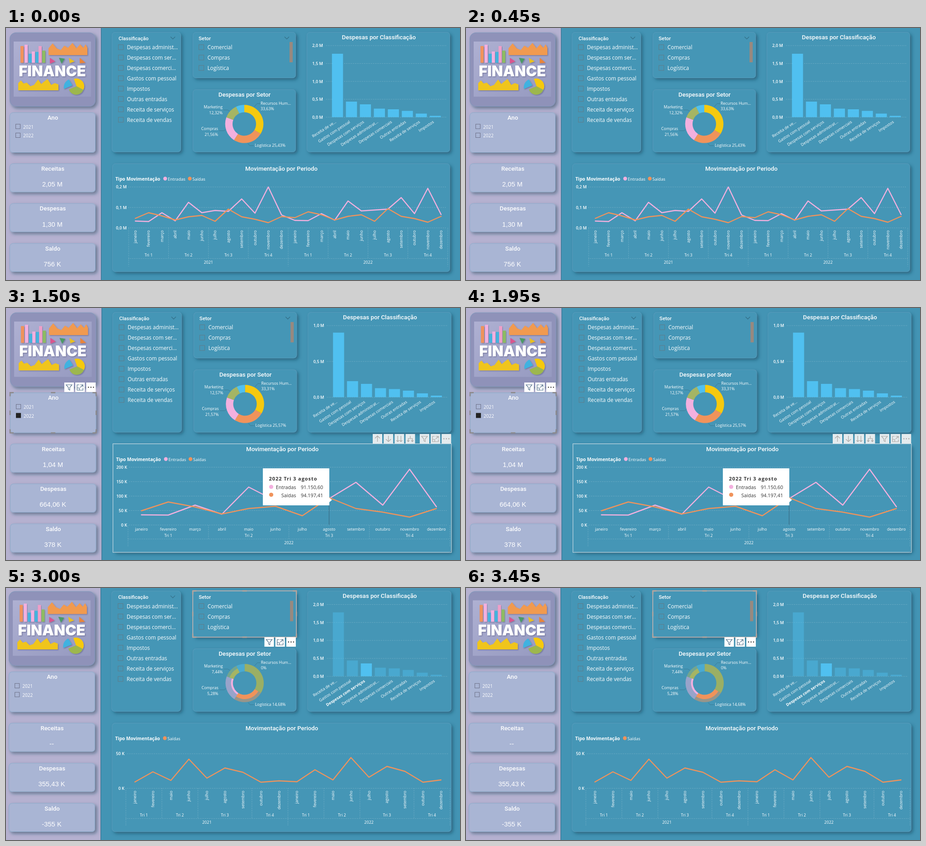
Animation, 1004 px wide and 558 px high, one loop 3.75 s. Source, as an HTML page:

```html
<!DOCTYPE html>
<html lang="pt">
<head>
<meta charset="utf-8">
<title>Painel financeiro</title>
<style>
html, body { margin: 0; width: 100%; height: 100%; overflow: hidden; background: #4394b4; }
svg { display: block; width: 100vw; height: 100vh; }
text { font-family: "Open Sans", "Noto Sans", sans-serif; fill: #fff; white-space: pre; }
.t { font-family: Roboto, sans-serif; font-weight: 500; }
.v { font-family: "Liberation Sans", Arial, sans-serif; }
.h { font-family: Inter, sans-serif; font-weight: 900; }
.b { font-weight: 700; }
.m { font-weight: 600; }
.d { fill: #333; }
.dot { stroke: #b4d3df; stroke-width: 1; stroke-dasharray: 1 3; fill: none; opacity: .75; }
</style>
</head>
<body>
<svg id="stage" viewBox="0 0 1004 558" preserveAspectRatio="none"></svg>
<script>
const HOLD = 750;
const YELLOW = '#f6c90e', ORANGE = '#f0935b', PINK = '#f3b0df', GREEN = '#a5b564', BLUE = '#50c0f0';
const MONTHS = 'janeiro fevereiro março abril maio junho julho agosto setembro outubro novembro dezembro'.split(' ');
const KINDS = ['Despesas administ...', 'Despesas com ser...', 'Despesas comerci...', 'Gastos com pessoal',
  'Impostos', 'Outras entradas', 'Receita de serviços', 'Receita de vendas'];
const BAR_NAMES = ['Receita de ve...', 'Gastos com pessoal', 'Despesas com serviços', 'Despesas administrat...',
  'Despesas comerciais', 'Outras entradas', 'Receita de serviços', 'Impostos'];
const PANELS = {
  kind: [234, 9, 153, 266], sector: [413, 9, 228, 102], ring: [413, 136, 228, 139],
  bars: [665, 9, 317, 266], flow: [235, 300, 747, 240], year: [8, 187, 190, 89]
};

const text = (x, y, s, size, cls = '', anchor = 'start', more = '') =>
  `<text x="${x}" y="${y}" font-size="${size}" class="${cls}" text-anchor="${anchor}" ${more}>${s}</text>`;
const rect = (x, y, w, h, fill, more = '') =>
  `<rect x="${x}" y="${y}" width="${w}" height="${h}" fill="${fill}" ${more}/>`;
const disc = (x, y, r, fill) => `<circle cx="${x}" cy="${y}" r="${r}" fill="${fill}"/>`;
const path = (d, fill, more = '') => `<path d="${d}" fill="${fill}" ${more}/>`;
const stroke = (d, color, width = 1, more = '') =>
  path(d, 'none', `stroke="${color}" stroke-width="${width}" ${more}`);
const dots = d => `<path class="dot" d="${d}"/>`;
const each = (list, fn) => list.map(fn).join('');

function panel([x, y, w, h], fill = '#4596b6', r = 7) {
  return rect(x, y, w, h, fill, `rx="${r}" filter="url(#shade)"`) +
    rect(x + .5, y + .5, w - 1, h - 1, 'none', `rx="${r}" stroke="#6f9fc0" stroke-opacity=".45"`);
}

function box(x, y, on, color, size = 11) {
  return rect(x, y, size, size, on ? '#222' : 'none', `stroke="${on ? '#222' : color}"`);
}

const chevron = x => stroke(`M${x - 5} 19.5l5 5 5-5`, '#346f88', 1.2);

// Selection frame with corner and edge handles
function frame([x, y, w, h], line) {
  const r = x + w, b = y + h, cx = x + w / 2, cy = y + h / 2, n = 8;
  const grips = `M${x} ${y + n}v${-n}h${n}M${r - n} ${y}h${n}v${n}M${r} ${b - n}v${n}h${-n}M${x + n} ${b}h${-n}v${-n}` +
    `M${cx - 5} ${y}h10M${cx - 5} ${b}h10M${x} ${cy - 5}v10M${r} ${cy - 5}v10`;
  return (line ? rect(x, y, w, h, 'none', `stroke="${line}" stroke-width="1.6"`) : '') +
    stroke(grips, line ? '#b9a69d' : '#8d8a8c', 2.6);
}

const ICONS = {
  filter: 'M4 5h13l-5 6v6l-3-2v-4z',
  focus: 'M9 5H4v12h13v-5M11 5h6v5M17 5l-6 6M4 12h5v5',
  up: 'M10.500 17V4M5 9.500l5.500-5.500 5.500 5.500',
  down: 'M10.500 4v13M5 11.500l5.500 5.500 5.500-5.500',
  twin: 'M7 4v13M14 4v13M4 14l3 3 3-3M11 14l3 3 3-3',
  fork: 'M10.500 4v6M6 16v-6h9v6M3.500 14l2.500 3 2.500-3M12.500 14l2.500 3 2.500-3'
};

function tools(x, y, names, faded) {
  const ink = faded ? '#a9a5a2' : '#51708a';
  return each(names.split(' '), (name, i) =>
    `<g transform="translate(${x + i * 24.2} ${y})">` + rect(0, 0, 21, 21, faded ? '#e4ebee' : '#fff') +
    (name === 'more' ? each([5, 10.5, 16], cx => disc(cx, 10.5, 1.3, faded ? ink : '#333')) : stroke(ICONS[name], ink, 1.2)) +
    '</g>');
}
const MENU = 'filter focus more';

function photo() {
  const bars = [[32, 40, ORANGE], [41, 37, PINK], [50, 57, '#45b3dd'], [57, 52, PINK], [65, 53, '#45b3dd'],
    [72, 40, '#ef9fc8'], [80, 50, '#8dbb62']];
  const bits = [[97, '#d9568f', 'v13l12-5z'], [117, '#4c9a66', 'l13 2-7 11z'], [139, '#e8bf24', 'l13 8-11 4z'], [163, '#e8853a', 'l13 11-13 1z']];
  return panel([8, 10, 190, 164], '#8f92b9', 14) + rect(17, 30, 171, 122, '#a3a6ca') +
    rect(17, 30, 171, 122, 'url(#glow)') +
    each(bars, ([x, y, c]) => rect(x, y, 7, 77 - y, c, 'filter="url(#lift)"')) +
    '<g filter="url(#lift)">' +
    path('M94 60V45l9-11 9 11 9 4 8-10 8 5 10-11 9 12 8-9 7 8 5-8 4 8v16z', '#f19a50') +
    each(bits, ([x, c, d]) => path(`M${x} 66${d}`, c)) +
    path('M27 138v-16l6-6 6 7 7-2 8 8 8-3 9-12 7 10 7-6 7-5 8 13 8-4 8 3v13z', '#f0c51d') +
    path('M156 129l-6-16a17 17 0 0 1 21 24z', YELLOW) +
    path('M156 129l15 8a17 17 0 0 1-32-1z', '#9db74e') +
    path('M147 127l-19 8q-2-14 11-21z', '#3fb2e0') +
    text(102.500, 107, 'FINANCE', 32.5, 'h', 'middle') + '</g>';
}

function board(s) {
  const [x, y, k] = s.view;
  const cards = ['Receitas', 'Despesas', 'Saldo'];
  const kinds = s.kinds || KINDS;
  const list = (names, left, on) => each(names, (n, i) =>
    box(left + .5, 37 + 22.95 * i, i === on, '#5f7c8a') + text(left + 19.500, 47.2 + 22.95 * i, n, 11.8));
  return rect(0, 0, 1004, 558, '#4394b4') + `<g transform="translate(${x} ${y}) scale(${k})">` +
    rect(-9, -9, 219, 590, '#b5b1d0') + stroke('M210.500 -9V590', '#39708f', 1.2) + photo() +
    panel(PANELS.year, '#a9b5d4') + text(103.500, 203, 'Ano', 13.2, 't', 'middle') +
    each([2021, 2022], (n, i) => box(21.5, 213 + i * 19.5, n === s.year, '#6c7088', 10) + text(38, 222.7 + i * 19.5, n, 10)) +
    each(cards, (n, i) => panel([8, 300 + i * 88.3, 190, 63.5], '#a9b5d4') +
      text(103.500, 316 + i * 88.4, n, 13.2, 't', 'middle') + text(102.500, 351 + i * 88.5, s.totals[i], 14.7, 'v', 'middle')) +
    each(['kind', 'sector', 'ring', 'bars', 'flow'], n => panel(PANELS[n])) +
    text(249, 27, 'Classificação', 11, 't') + text(426, 27, 'Setor', 11.3, 't') +
    list(kinds, 248, s.kind) + list(['Comercial', 'Compras', 'Logística'], 426, s.sector) +
    rect(627, 31, 7, 45, '#98897f') + each(s.chevrons, chevron) +
    text(824.500, 25, 'Despesas por Classificação', 13.2, 't', 'middle') +
    text(527.500, 152, 'Despesas por Setor', 13.2, 't', 'middle') +
    text(609, 316, 'Movimentação por Periodo', 13.2, 't', 'middle') +
    (s.hover ? rect(...PANELS[s.hover], 'none', 'stroke="#c4dbe4" stroke-width="1.2"') : '') +
    (s.pick ? frame(PANELS[s.pick], s.pick === 'year' ? '' : '#c8b6b0') : '') + '</g>';
}

function grid(labels, y0, step, end, x0, x1) {
  return each(labels, (n, i) => {
    const y = y0 + i * step;
    return dots(`M${x0} ${y}H${x1}`) + text(end, y + 3.3, n, 9.2, 'm', 'end');
  });
}

function slantBars(x, base, tops, names, focus = -1) {
  return each(tops, (y, i) => {
    const left = x + i * 30.9, lit = focus < 0 || i === focus;
    const tx = left + 10, ty = base + 12;
    return rect(left, y, 24.5, base - y, BLUE, lit ? '' : 'opacity=".42"') +
      text(tx, ty, names[i], 8.9, i === focus ? 'b' : '', 'end', `transform="rotate(-33 ${tx} ${ty})"`);
  });
}

function wideBars(bars, base) {
  return each(bars, ([x, y, ...lines]) => rect(x, y, 57.5, base - y, BLUE) +
    each(lines, (n, i) => text(x + 29.5, base + 19 + i * 12.7, n, 8.8, '', 'middle')));
}

function arc(cx, cy, r0, r1, a, b, fill, more) {
  const at = (r, t) => `${cx + r * Math.sin(t * 2 * Math.PI)} ${cy - r * Math.cos(t * 2 * Math.PI)}`;
  const big = +(b - a > .5);
  return path(`M${at(r1, a)}A${r1} ${r1} 0 ${big} 1 ${at(r1, b)}L${at(r0, b)}A${r0} ${r0} 0 ${big} 0 ${at(r0, a)}z`, fill, more);
}

const SHADES = [YELLOW, ORANGE, PINK, GREEN, BLUE];
const INNER = 26, OUTER = 42.3;

// lit: highlighted portion of each slice, measured from the inner edge
function ring(cx, cy, parts, shown, lit) {
  let a = 0;
  const slices = each([...parts, 100 - parts.reduce((p, q) => p + q)], (p, i) => {
    const b = a + p / 100;
    let out = arc(cx, cy, INNER, OUTER, a, b, SHADES[i], lit ? 'opacity=".48"' : '');
    if (lit && lit[i]) out += arc(cx, cy, INNER, INNER + (OUTER - INNER) * lit[i], a, b, SHADES[i]);
    a = b;
    return out;
  });
  const small = (x, y, n, anchor) => text(cx + x, cy + y, n, 8.9, '', anchor);
  return slices +
    stroke(`M${cx + 22} ${cy - 38}l6-7h7M${cx + 8} ${cy + 43}l4 5h9M${cx - 46} ${cy - 31}h9l5 3M${cx - 56} ${cy + 15}h11l4-3`, '#3a7c97') +
    small(36, -42.5, 'Recursos Hum...') + small(36, -30.3, shown[0]) + small(23, 50.7, 'Logística ' + shown[1]) +
    small(-58, 13.6, 'Compras', 'end') + small(-58, 26, shown[2], 'end') +
    small(-48, -34.5, 'Marketing', 'end') + small(-48, -22, shown[3], 'end');
}

function fullRing(cx, cy, color, label) {
  return `<circle cx="${cx}" cy="${cy}" r="34.100" fill="none" stroke="${color}" stroke-width="16.500"/>` +
    stroke(`M${cx} ${cy + 43}l4 5h7`, '#3a7c97') + text(cx + 12.500, cy + 51.500, label, 8.9);
}

function legend(x, y, both) {
  const key = (dx, c, n) => disc(x + dx, y - 4, 4.2, c) + text(x + dx + 5.7, y, n, 9.5);
  return text(x, y, 'Tipo Movimentação', 10.1, 'b') +
    (both ? key(110, PINK, 'Entradas') + key(164.500, ORANGE, 'Saídas') : key(109.800, ORANGE, 'Saídas'));
}

// Month, quarter and year captions under the line chart
function calendar(x, step, months, years, top, rule, upright) {
  const n = months.length, edge = i => x + (i - .5) * step;
  return each(years, (year, k) => {
    const from = k * n;
    let out = '';
    for (let i = 0, start = 0; i < n; i++) {
      const cx = x + (from + i) * step, q = months[i] / 3 | 0;
      out += upright
        ? text(cx + 3, top + 5, MONTHS[months[i]], 8.8, '', 'end', `transform="rotate(-90 ${cx + 3} ${top + 5})"`)
        : text(cx, rule - 18.500, MONTHS[months[i]], 8.8, '', 'middle');
      if (i === n - 1 || (months[i + 1] / 3 | 0) !== q) {
        out += text(x + (from + (start + i) / 2) * step, rule - 4.8, 'Tri ' + (q + 1), 8.9, '', 'middle');
        if (i < n - 1) out += dots(`M${edge(from + i + 1)} ${top}V${rule}`);
        start = i + 1;
      }
    }
    return out + dots(`M${edge(from)} ${top}V${rule + 17}`) +
      text(x + (from + (n - 1) / 2) * step, rule + 11.700, year, 9, '', 'middle');
  }) + dots(`M${edge(n * years.length)} ${top}V${rule + 17}M${edge(0)} ${rule}H${edge(n * years.length)}`);
}

const line = (x, step, ys, color) =>
  stroke('M' + ys.map((y, i) => `${x + i * step} ${y}`).join('L'), color, 2.4, 'stroke-linejoin="round" stroke-linecap="round"');

const ALL = MONTHS.map((_, i) => i), BOTH = [2021, 2022];

const scenes = [
  board({ view: [0, 0, 1], totals: ['2,05 M', '1,30 M', '756 K'], chevrons: [369, 621] }) +
  grid(['2,0 M', '1,5 M', '1,0 M', '0,5 M', '0,0 M'], 39, 39.6, 701, 708, 974) +
  slantBars(720.800, 197.500, [57, 163, 169, 178.5, 180, 183.5, 189.5, 194.5], BAR_NAMES) +
  ring(527, 212.500, [33.63, 25.43, 21.56, 12.32], ['33,63%', '25,43%', '21,56%', '12,32%']) +
  legend(242, 337.500, true) + grid(['0,2 M', '0,1 M', '0,0 M'], 352, 45.3, 267, 271, 974) +
  calendar(286, 29.4, ALL, BOTH, 443, 510.500, true) +
  line(286, 29.4, [427.5, 428.5, 409, 427, 386, 409, 404, 406, 378.5, 410, 352, 414,
    426, 426.5, 411, 425.5, 383, 405, 403, 401, 375.5, 411, 355, 413], PINK) +
  line(286, 29.4, [421.5, 409, 416, 425, 418, 415, 428, 401, 418, 423.5, 431, 417.5,
    420, 407, 413.5, 425, 417, 413.5, 428, 400, 417, 422, 430, 417], ORANGE),

  board({ view: [3, -1.2, .998], totals: ['--', '436,31 K', '-436 K'], chevrons: [], kind: 3, pick: 'kind', hover: 'bars' }) +
  grid(['0,4 M', '0,2 M', '0,0 M'], 76, 77, 699, 705, 973) +
  wideBars([[811, 62, 'Gastos com', 'pessoal']], 230) + fullRing(528.500, 211, YELLOW, 'Recursos ... 100%') +
  legend(245, 336) + grid(['50 K', '40 K', '30 K', '20 K'], 351, 36.3, 265, 270, 974) +
  calendar(292.500, 50.65, [1, 2, 3, 4, 7, 8, 11], BOTH, 479, 508.500) +
  line(292.500, 50.65, [423.5, 436, 427.5, 466, 362.5, 446.5, 381.5, 417.5, 426.5, 436.5, 458.5, 366.5, 441, 374.5], ORANGE) +
  tools(320, 274, MENU) + tools(913, 274, MENU) +
  path('M619 160h215v7l6 5-6 5v45.500h-215z', '#fff') +
  text(707.500, 188, 'Classificação', 11, 'd', 'end') + text(718, 188, 'Gastos com pessoal', 11, 'd') +
  text(707.500, 205, 'Soma de Valor', 11, 'd', 'end') + text(718, 205, '436.308,76', 11, 'd'),

  board({ view: [1, 0, 1.002], totals: ['1,04 M', '664,06 K', '378 K'], chevrons: [369, 621], year: 2022, pick: 'year', hover: 'flow' }) +
  grid(['1,0 M', '0,5 M', '0,0 M'], 39, 79.3, 703.5, 710, 976) +
  slantBars(723.200, 197.500, [54.5, 162, 168, 177.5, 179.5, 183, 189, 194], BAR_NAMES) +
  ring(528.500, 212.500, [33.31, 25.57, 21.57, 12.57], ['33,31%', '25,57%', '21,57%', '12,57%']) +
  legend(243.500, 338.500, true) + grid(['200 K', '150 K', '100 K', '50 K', '0 K'], 352.5, 32, 268, 273, 976) +
  calendar(299.500, 59.3, ALL, [2022], 482, 511.500) +
  line(299.500, 59.3, [458, 458.5, 436.5, 456.5, 396.5, 427, 424, 422, 386, 436.5, 357, 440], PINK) +
  line(299.500, 59.3, [449, 429.5, 440.5, 456, 444, 439, 460, 420, 444, 452, 463, 444], ORANGE) +
  tools(129, 165, MENU) + tools(811, 279, 'up down twin fork', true) + tools(915, 279, MENU, true) +
  stroke('M714.500 420V480', '#37627a') +
  path('M568 355h147v65l6 5-6 5v7h-147z', '#fff') +
  text(581.500, 381.500, '2022 Tri 3 agosto', 11, 'b d', 'start', 'letter-spacing=".95"') +
  disc(586.500, 396, 4.6, PINK) + text(641.500, 400.700, 'Entradas', 10.9, 'd', 'end') + text(652, 400.700, '91.150,60', 10.9, 'd') +
  disc(586.500, 413.500, 4.6, ORANGE) + text(641.500, 418.700, 'Saídas', 10.9, 'd', 'end') + text(652, 418.700, '94.197,41', 10.9, 'd'),

  board({ view: [0, -.3, 1.0065], totals: ['--', '329,86 K', '-330 K'], chevrons: [369], sector: 2, pick: 'sector',
    kinds: [KINDS[0], KINDS[1], KINDS[4]] }) +
  grid(['200 K', '150 K', '100 K', '50 K', '0 K'], 38, 48.5, 701, 708, 980) +
  wideBars([[739.5, 47, 'Despesas com', 'serviços'], [814.8, 137, 'Despesas', 'administrativas'], [890.2, 191.5, 'Impostos']], 232.3) +
  fullRing(529.700, 213.300, ORANGE, 'Logística 100%') +
  legend(243.500, 339) + grid(['40 K', '20 K', '0 K'], 354, 47, 263, 270, 980) +
  calendar(287, 39.88, [0, 1, 2, 4, 5, 6, 7, 8, 9], BOTH, 448, 513, true) +
  line(287, 39.88, [408, 429, 412, 415.5, 376.5, 394, 405, 382, 430.5,
    405.5, 426.5, 408, 415.5, 372, 392, 403, 378.5, 430.5], ORANGE) +
  tools(573.500, 111.500, MENU),

  board({ view: [-2, -2.7, 1.005], totals: ['--', '355,43 K', '-355 K'], chevrons: [369], pick: 'sector' }) +
  grid(['2,0 M', '1,5 M', '1,0 M', '0,5 M', '0,0 M'], 36.5, 39.8, 703, 710, 977) +
  slantBars(722.800, 195.500, [54, 160.5, 167, 176.5, 178, 181.5, 187.5, 192], BAR_NAMES, 2) +
  ring(527.700, 210.500, [33.63, 25.43, 21.56, 12.32], ['0%', '14,68%', '5,28%', '7,44%'], [0, .58, .25, .6, 0]) +
  legend(241.500, 336.500) + grid(['50 K', '0 K'], 367, 76.5, 262, 268, 977) +
  calendar(285, 39.82, [0, 1, 4, 5, 6, 7, 8, 9, 11], BOTH, 444, 510.500, true) +
  line(285, 39.82, [429.5, 407, 426, 379, 421, 398.5, 408, 430, 427,
    429, 402.5, 425, 375.5, 419, 395, 406, 430, 425], ORANGE) +
  tools(571.500, 109, MENU)
];

const stage = document.getElementById('stage');
stage.innerHTML = `<defs>
  <filter id="shade" x="-10%" y="-15%" width="125%" height="140%"><feDropShadow dx="4" dy="4" stdDeviation="3.500" flood-color="#123a52" flood-opacity=".5"/></filter>
  <filter id="lift" x="-20%" y="-20%" width="140%" height="140%"><feDropShadow dx="1.500" dy="1.500" stdDeviation="1" flood-color="#4a4a75" flood-opacity=".5"/></filter>
  <linearGradient id="glow" x2="1" y2="1"><stop stop-color="#b4b5d6" stop-opacity=".7"/><stop offset="1" stop-color="#8d92ba" stop-opacity=".6"/></linearGradient>
</defs>` + each(scenes, s => `<g class="scene">${s}</g>`);
const layers = stage.querySelectorAll('.scene');

function show(t) {
  const now = Math.floor(t / HOLD) % layers.length;
  layers.forEach((g, i) => g.setAttribute('display', i === now ? 'inline' : 'none'));
}

let start;
function tick(t) {
  start ??= t;
  show(t - start);
  requestAnimationFrame(tick);
}
show(0);
requestAnimationFrame(tick);
</script>
</body>
</html>
```
